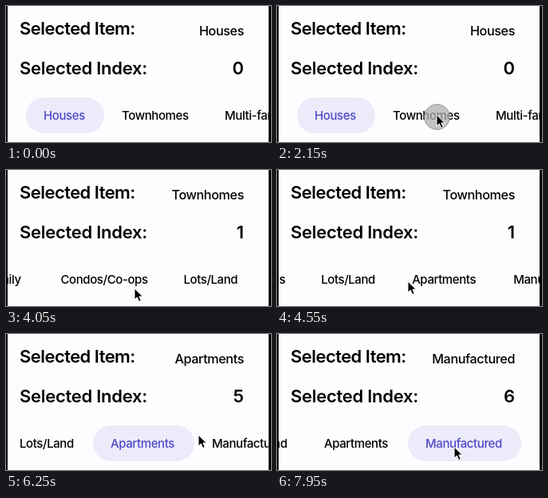
An HTML page that plays this animation: 332 px wide and 171 px high, repeating every 8 s.

```html
<!DOCTYPE html>
<html lang="en">
<head>
<meta charset="utf-8">
<title>Chip list</title>
<style>
  html, body { margin: 0; width: 100%; height: 100%; overflow: hidden; background: #fdfcff; }
  svg { display: block; width: 100%; height: 100%; }
  text { font-family: Inter, Roboto, sans-serif; fill: #000; }
  .head { font-size: 22px; font-weight: 600; letter-spacing: -.55px; }
  .loose { letter-spacing: -.28px; }
  .value { font-size: 16.2px; font-weight: 500; letter-spacing: -.4px; text-anchor: end; }
  .index { text-anchor: end; letter-spacing: 0; }
  .chip { font-size: 15px; font-weight: 500; letter-spacing: -.4px; }
</style>
</head>
<body>
<svg viewBox="0 0 332 171">
  <defs><clipPath id="view"><rect x="2" width="327" height="171"/></clipPath></defs>
  <rect width="332" height="171" fill="#fdfcff"/>
  <text class="head" x="17" y="36">Selected Item:</text>
  <text class="head loose" x="17" y="86">Selected Index:</text>
  <text class="value" id="item" x="298" y="37"></text>
  <text class="head index" id="index" x="298" y="86"></text>
  <g clip-path="url(#view)"><g id="strip"></g></g>
  <path d="M0 0H2V171H0ZM329 0H332V171H329Z" fill="#000"/>
  <circle id="touch" r="16" fill="#b1b1b3" fill-opacity=".75" stroke="#8e8e92" stroke-opacity=".8"/>
  <path id="arrow" d="M0 0V14L3.3 11L5.7 16.4L8.3 15.3L5.9 10H10.3Z" fill="#000" stroke="#fff" stroke-linejoin="round"/>
</svg>
<script>
const LOOP = 8000, FADE = 200, PAD = 23, LAG = 50;
const ACCENT = [77, 72, 200];
const $ = id => document.getElementById(id);

// label and text width; the chips follow each other without a gap
const labels = {
  'Houses': 52, 'Townhomes': 83, 'Multi-family': 85, 'Condos/Co-ops': 108,
  'Lots/Land': 68, 'Apartments': 81, 'Manufactured': 96
};

// time, chosen chip
const picks = [[-FADE, 0], [2400, 1], [5500, 5], [7550, 6]];

// pointer moves: start, end, x and y reached
const origin = [346, 111];
const glides = [
  [720, 1350, 184, 136], [1350, 1550, 200, 137], [2750, 3200, 282, 152], [3300, 3850, 161, 149],
  [4050, 4800, 165, 137], [5850, 6250, 241, 127], [6300, 6650, 150, 138], [6750, 7250, 222, 142]
];

// finger down, finger up
const presses = [[1340, 1720], [2020, 2200], [3290, 3710], [4840, 5250], [6290, 6620], [7270, 7470]];

const clamp = v => Math.max(0, Math.min(1, v));
const part = (t, from, to) => clamp((t - from) / (to - from));
const smooth = u => u * u * (3 - 2 * u);

function add(name, attrs) {
  const node = document.createElementNS('http://www.w3.org/2000/svg', name);
  for (const key in attrs) node.setAttribute(key, attrs[key]);
  return $('strip').appendChild(node);
}

let left = 25;
const chips = Object.entries(labels).map(([label, w]) => {
  const width = w + 2 * PAD;
  const pill = add('rect', { x: left, y: 115, width, height: 45, rx: 22.5, fill: '#ecebfa' });
  const text = add('text', { class: 'chip', x: left + PAD - 1, y: 143 });
  text.textContent = label;
  left += width;
  return { label, pill, text };
});

function scrollAt(t) {
  const tug = -8.2 * Math.sin(Math.PI * part(t, 1350, 2100) ** .7);
  const drag = 125 * part(t, 3300, 3700) ** 2;
  const fling = 417 * (1 - (1 - part(t, 3700, 5000)) ** 2.25);
  const swipe = 110 * smooth(part(t, 6300, 6700));
  const bounce = -38 * smooth(part(t, 6700, 7250));
  return tug + drag + fling + swipe + bounce;
}

function pointerAt(t) {
  let [x, y] = origin;
  for (const [from, to, nextX, nextY] of glides) {
    const u = smooth(part(t, from, to));
    x += (nextX - x) * u;
    y += (nextY - y) * u;
  }
  return [x, y];
}

function move(node, x, y) {
  node.setAttribute('transform', `translate(${x} ${y})`);
}

function draw(t) {
  const now = picks.findLastIndex(([start]) => t >= start);
  const [start, chosen] = picks[now];
  const last = now ? picks[now - 1][1] : -1;
  const mix = clamp((t - start + 50) / FADE);

  $('item').textContent = chips[chosen].label;
  $('index').textContent = chosen;
  chips.forEach(({ pill, text }, i) => {
    const on = i === chosen ? mix : i === last ? 1 - mix : 0;
    pill.style.opacity = on;
    text.style.fill = `rgb(${ACCENT.map(c => Math.round(c * on))})`;
  });

  move($('strip'), -scrollAt(t), 0);
  move($('arrow'), ...pointerAt(t));
  const [x, y] = pointerAt(t - LAG);
  move($('touch'), x + .5, y + 2.5);
  $('touch').style.opacity = Math.max(...presses.map(([down, up]) =>
    Math.min(part(t, down, down + 60), 1 - part(t, up, up + 50))));
}

const begin = performance.now();
function tick() {
  draw((performance.now() - begin) % LOOP);
  requestAnimationFrame(tick);
}
tick();
</script>
</body>
</html>
```
